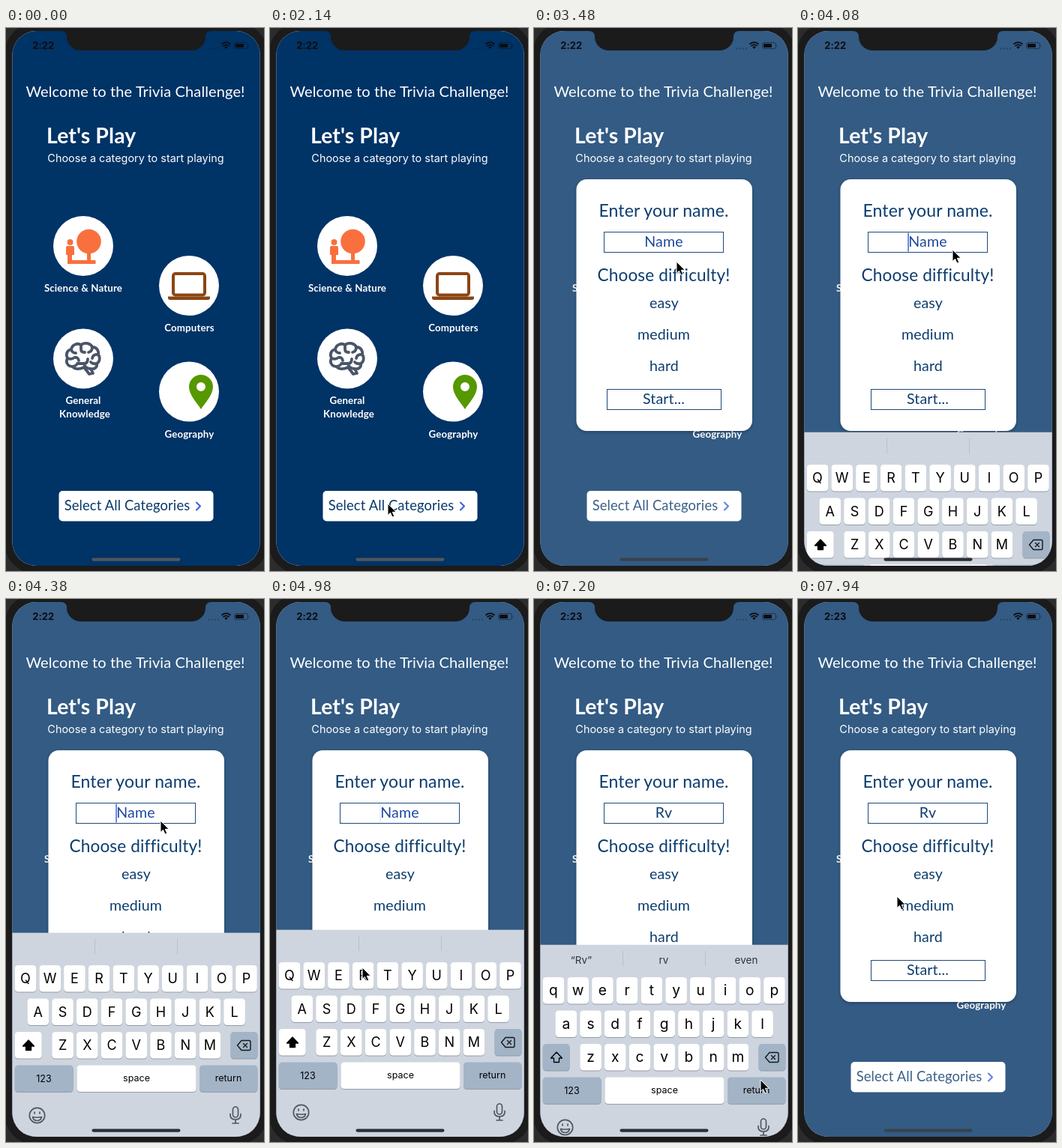
Write an HTML page that moves like this. It is 344 px wide and 725 px high and loops after 8000 ms.

```html
<!DOCTYPE html>
<html lang="en">
<head>
<meta charset="utf-8">
<title>Trivia app</title>
<style>
  html, body { margin: 0; width: 100%; height: 100%; overflow: hidden; background: #2c2c2d; }
  svg { display: block; font-family: Lato, "Open Sans", sans-serif; font-variant-ligatures: none; }
  text { text-anchor: middle; letter-spacing: .12px; }
  .ui, .ui text { font-family: Inter, Roboto, sans-serif; letter-spacing: .03px; }
  .label { font-size: 13.3px; font-weight: 700; fill: #fff; }
  .line { fill: none; stroke-linecap: round; stroke-linejoin: round; }
</style>
</head>
<body>
<svg width="344" height="725" viewBox="0 0 344 725">
  <defs>
    <clipPath id="screen"><rect x="8.400" y="4" width="330.300" height="714" rx="32"/></clipPath>
    <filter id="shadow" x="-10%" y="-10%" width="120%" height="120%">
      <feDropShadow dx="0" dy="1.5" stdDeviation="2" flood-opacity=".3"/>
    </filter>
  </defs>
  <rect x="-1" y="-6" width="349" height="734" rx="38" fill="#1b1b1c"/>

  <g clip-path="url(#screen)">
    <rect width="344" height="725" fill="#fff"/>
    <g id="home">
      <rect width="344" height="725" fill="#036"/>
      <g fill="#fff">
        <text x="172.5" y="92" font-size="20">Welcome to the Trivia Challenge!</text>
        <text x="113.7" y="154" font-size="28.4" font-weight="700">Let's Play</text>
        <text class="ui" x="173" y="179" font-size="14.4">Choose a category to start playing</text>
        <circle cx="103" cy="291" r="40"/>
        <circle cx="244" cy="344" r="40"/>
        <circle cx="103" cy="441.5" r="40"/>
        <circle cx="244" cy="485.5" r="40"/>
      </g>
      <g class="label">
        <text x="103" y="352">Science &amp; Nature</text>
        <text x="244.5" y="405">Computers</text>
        <text x="103" y="502">General</text>
        <text x="105" y="520">Knowledge</text>
        <text x="244.5" y="547">Geography</text>
      </g>

      <g fill="#f9703e">
        <circle cx="110.5" cy="285" r="16.3"/>
        <path d="M108 295h5v15h6.500v5H82v-12h-2v-10q0-2 2-2h7q2 0 2 2v10h-3v7h20z"/>
        <circle cx="85.500" cy="286" r="4"/>
      </g>
      <g fill="#8b4513">
        <rect x="223" y="328" width="42" height="28.500" rx="3" fill="none" stroke="#8b4513" stroke-width="4"/>
        <path d="M216 358.500h56v2q0 2.500-3 2.500h-50q-3 0-3-2.500z"/>
      </g>
      <g class="line" stroke="#4a5568" stroke-width="3.800">
        <path d="M89 452c-7 0-10-6-7-11c-3-6 0-11 5-12c1-6 8-9 13-6c5-4 13-2 15 3c6 0 9 5 8 10c3 4 2 10-2 12c1 5-3 8-8 7l3 6l-5 1l-7-9c-6 3-13 3-15-1z"/>
        <path d="M87 429q1 5 6 5M100 423v6q0 4 5 4M82 441q6 2 9-1q5-1 6 4M89 452q5-1 6-4h9q5 0 5-6M115 426q0 6-5 7M123 436q-7-1-8 5M121 448q-6 1-8-2M104 448q1 6 8 7"/>
      </g>
      <path fill="#569800" fill-rule="evenodd" d="M260 463a16 16 0 0 1 16 16c0 11-11 22-16 30c-5-8-16-19-16-30a16 16 0 0 1 16-16zm0 10a6 6 0 1 0 0 12a6 6 0 1 0 0-12z"/>

      <g id="selectAll">
        <rect x="70.500" y="618" width="206" height="40.500" rx="5" fill="#fff"/>
        <text x="161.500" y="644" font-size="18.4" fill="#0a3a6c">Select All Categories</text>
        <path class="line" d="M254 633.500l5 5l-5 5" stroke="#3b5fe0" stroke-width="2"/>
      </g>
    </g>

    <g id="modal" fill="#0d3d6f">
      <rect x="56.500" y="202" width="234.500" height="336" rx="14" fill="#fff" filter="url(#shadow)"/>
      <text x="173" y="252" font-size="23">Enter your name.</text>
      <text x="173" y="338" font-size="22.6">Choose difficulty!</text>
      <g fill="none" stroke="#1d4a78">
        <rect x="93.500" y="272.500" width="159" height="27"/>
        <rect x="97.500" y="482.500" width="152" height="27"/>
      </g>
      <g font-size="19.6">
        <text id="field" x="173" y="292"></text>
        <text x="173.500" y="374">easy</text>
        <text x="173" y="416">medium</text>
        <text x="173.500" y="458">hard</text>
        <text x="173" y="502">Start...</text>
      </g>
      <rect id="caret" y="273.500" width="1.500" height="25" fill="#3d63dd"/>
    </g>

    <g id="keyboard" class="ui"></g>

    <g fill="#0c0d10">
      <text id="clock" class="ui" x="49.700" y="28" font-size="13" font-weight="700"></text>
      <path d="M293.500 28l-2.200-2.600q2.200-1.800 4.400 0z"/>
      <path class="line" d="M290 23.700q3.500-2.800 7 0M288 21.300q5.500-4.200 11 0" stroke="#0c0d10" stroke-width="1.700"/>
      <rect x="304.500" y="19.500" width="18" height="8" rx="2.500" fill="none" stroke="#0c0d10" stroke-opacity=".5"/>
      <rect x="306" y="21" width="11" height="5" rx="1"/>
      <path d="M324 22q1.500 1.500 0 3z" opacity=".5"/>
      <path d="M270 27.500h14" stroke="#0c0d10" stroke-width="2" stroke-dasharray="2 2" opacity=".28"/>
    </g>
    <rect id="homeBar" x="114.500" y="707.500" width="118" height="4.200" rx="2.100"/>
    <path d="M73 0V4Q81 4 81 12A19 18 0 0 0 100 30H247A19 18 0 0 0 266 12Q266 4 274 4V0z" fill="#1b1b1c"/>
  </g>

  <path id="pointer" d="M0 0V15.500L3.500 12.300L6 18L8.700 16.800L6.300 11.300H11.200z" fill="#000" stroke="#fff" stroke-width="1" stroke-linejoin="round"/>
</svg>

<script>
const $ = id => document.getElementById(id);
const LOOP = 8000, START = 494, STEP = 148.8;

const pointerTrack = [
  [0, 305, 553], [1, 295, 599], [2, 295, 599], [7, 157, 633], [8, 157, 633], [9, 157, 635],
  [16, 157, 635], [17, 152, 606], [18, 131, 500], [19, 140, 390], [20, 190, 312], [21, 206, 296],
  [26, 206, 296], [30, 123, 492], [32, 123, 492], [37, 173, 592], [39, 173, 592],
  [44, 302, 642], [47, 302, 642], [50, 132, 397]
];
const keyboardTrack = [
  [23, 278], [24, 98], [25, 20], [26, 4], [27, 0], [44, 0], [45, 20], [46, 150], [47, 268], [48, 278]
];
const modalTrack = [[11, 0], [12, .45], [13, .94], [14, 1]];
const buttonTrack = [[11, 1], [12, .5], [13, .85], [14, 1]];

function sample(track, step) {
  const next = track.findIndex(key => key[0] > step);
  if (next < 0) return track[track.length - 1].slice(1);
  if (next === 0) return track[0].slice(1);
  const a = track[next - 1], b = track[next];
  const u = (step - a[0]) / (b[0] - a[0]);
  return a.slice(1).map((v, i) => v + (b[i + 1] - v) * u);
}

const GREY = "#a3b4c7";
const key = (x, y, w, fill = "#fff", id = "") =>
  `<rect x="${x}" y="${y + 1}" width="${w}" height="35.500" rx="4.500" fill="#959ca6"/>
   <rect id="${id}" x="${x}" y="${y}" width="${w}" height="35.500" rx="4.500" fill="${fill}"/>`;
const caption = (x, y, size, text, attrs = "") =>
  `<text x="${x}" y="${y}" font-size="${size}" ${attrs}>${text}</text>`;

function buildKeyboard() {
  let s = `<rect x="8" y="441.700" width="332" height="290" fill="#ced5df"/>
    <path d="M118.500 450v20M228.500 450v20" stroke="#b9c1cb"/>`;
  [["qwertyuiop", 26], ["asdfghjkl", 42.8], ["zxcvbnm", 75.6]].forEach(([letters, x0], row) => {
    [...letters].forEach((letter, i) => {
      const x = x0 + i * 32.72, y = 485 + row * 44.5;
      s += key(x - 14.3, y, 28.6) + caption(x, y + 24.3, 18, letter, 'class="letter"');
    });
  });
  s += key(11.7, 574, 36, GREY, "shiftKey")
    + `<path id="shift" d="M30 585l7.500 8h-4v5.500h-7v-5.500h-4z" stroke="#000" stroke-width="1.300" stroke-linejoin="round"/>`
    + key(299.500, 574, 36, GREY)
    + `<path class="line" d="M308.500 592l5.500-6.500h10q2 0 2 2v9q0 2-2 2h-10zM316.500 589.500l5 5m0-5l-5 5" stroke="#16181b" stroke-width="1.400"/>`
    + key(11.7, 618.5, 78, GREY) + caption(50.500, 640.500, 12.5, "123")
    + key(94.5, 618.5, 159) + caption(174, 640, 12.5, "space")
    + key(258, 618.5, 77.5, GREY) + caption(296.500, 640, 12.5, "return");
  s += `<g class="line" stroke="#51575f" stroke-width="1.700">
      <circle cx="41.500" cy="685.500" r="10.200"/>
      <path d="M35.500 687.500q6 1.500 12 0q-1 5-6 5t-6-5zM38 681v2M45 681v2"/>
      <rect x="302.500" y="674" width="7" height="14" rx="3.500"/>
      <path d="M299 683.500v1.500q0 6 7 6t7-6v-1.500M306 691v5M302 696h8"/>
    </g>`;
  [63, 173, 283].forEach(x => { s += caption(x, 467, 13.5, "", 'class="hint" fill="#2f343b"'); });
  $("keyboard").innerHTML = s;
}

buildKeyboard();
const letters = [...document.querySelectorAll(".letter")];
const hints = [...document.querySelectorAll(".hint")];
const set = (id, name, value) => $(id).setAttribute(name, value);

function render(time) {
  const step = Math.floor((time - START) / STEP);
  const typed = step < 32 ? "" : step < 38 ? "R" : "Rv";
  const upper = !typed;

  const [shown] = sample(modalTrack, step);
  set("home", "opacity", 1 - .2 * shown);
  set("modal", "opacity", shown);
  set("selectAll", "opacity", sample(buttonTrack, step)[0]);

  $("field").textContent = typed || "Name";
  set("field", "fill", typed ? "#0d3d6f" : "#1c489f");
  const half = $("field").getComputedTextLength() / 2;
  set("caret", "x", typed ? 173 + half + 1 : 172 - half);
  set("caret", "opacity", step < 24 || step > 44 ? 0 : step === 30 ? .15 : 1);

  const [drop] = sample(keyboardTrack, step);
  set("keyboard", "transform", `translate(0 ${drop})`);
  set("keyboard", "visibility", drop < 277 ? "visible" : "hidden");
  letters.forEach(el => {
    el.textContent = upper ? el.textContent.toUpperCase() : el.textContent.toLowerCase();
    el.setAttribute("font-size", upper ? 18 : 19.2);
  });
  set("shiftKey", "fill", upper ? "#fff" : GREY);
  set("shift", "fill", upper ? "#000" : "none");
  const words = typed ? [`“${typed}”`, typed.toLowerCase(), "even"] : ["", "", ""];
  hints.forEach((el, i) => { el.textContent = words[i]; });

  $("clock").textContent = step < 34 ? "2:22" : "2:23";
  set("homeBar", "fill", shown < .4 ? "#51565c" : drop < 277 ? "#2b3036" : "#39424d");

  const [x, y] = sample(pointerTrack, step);
  set("pointer", "transform", `translate(${x} ${y})`);
  set("pointer", "visibility", step < 0 ? "hidden" : "visible");
}

const begin = performance.now();
function tick() {
  render((performance.now() - begin) % LOOP);
  requestAnimationFrame(tick);
}
tick();
</script>
</body>
</html>
```
